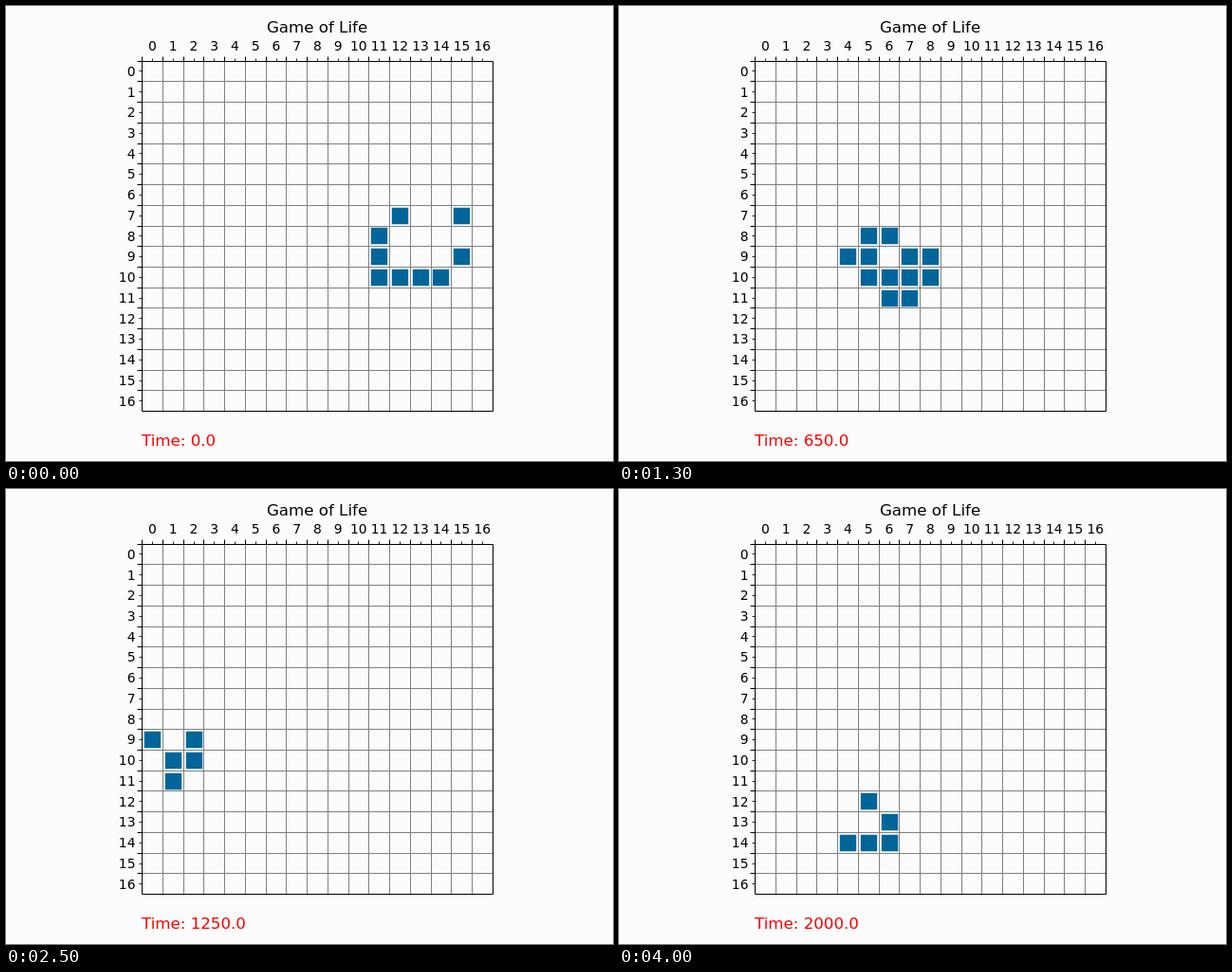
An HTML page that plays this animation: 640 by 480 pixels, repeating every 4100 ms.

```html
<!DOCTYPE html>
<html lang="en">
<head>
<meta charset="utf-8">
<title>Game of Life</title>
<style>
  html, body { margin: 0; width: 100%; height: 100%; overflow: hidden; background: #fcfcfc; }
  svg { display: block; width: 640px; height: 480px; font-family: "DejaVu Sans", sans-serif; font-size: 13.89px; }
  path { fill: none; }
  #grid { stroke: #808080; }
  #major, #frame { stroke: #000; }
  #minor { stroke: #2a2a2a; }
  #cells { fill: #069; }
  .big { font-size: 16.67px; }
  #time { fill: #f00; }
  .top, .title { text-anchor: middle; }
  .left { text-anchor: end; }
</style>
</head>
<body>
<svg viewBox="0 0 640 480">
  <path id="grid"/>
  <path id="major"/>
  <path id="minor"/>
  <path id="frame" d="M143.5 58.5H513.5V427.5H143.5Z"/>
  <path id="cells"/>
  <g id="labels"></g>
  <text class="big title" x="328" y="28">Game of Life</text>
  <text class="big" id="time" x="143" y="464"></text>
</svg>
<script>
const SIZE = 17, STEPS = 41, STEP_MS = 100;
const LEFT = 143.2, TOP = 57.6, CELL = 369.6 / SIZE;
const HALF = 8.69;

const $ = id => document.getElementById(id);
const px = i => LEFT + i * CELL;
const py = i => TOP + i * CELL;
const snap = v => Math.round(v) + 0.5;

function addLabel(text, cls, x, y) {
  const el = document.createElementNS("http://www.w3.org/2000/svg", "text");
  el.setAttribute("class", cls);
  el.setAttribute("x", x);
  el.setAttribute("y", y);
  el.textContent = text;
  $("labels").append(el);
}

function drawBoard() {
  let grid = "", major = "", minor = "";
  const ticks = (i, len) => `M${snap(px(i))} 58.5v${-len}M143.5 ${snap(py(i))}h${-len}`;
  for (let i = 0; i < SIZE; i++) {
    if (i) grid += `M${snap(px(i))} 58.5V427.5M143.5 ${snap(py(i))}H513.5`;
    major += ticks(i, 5);
    minor += ticks(i + 0.5, 3);
    addLabel(i, "top", px(i + 0.5) + 0.3, 47);
    addLabel(i, "left", 136.5, Math.round(py(i + 0.5) + 5.3));
  }
  $("grid").setAttribute("d", grid);
  $("major").setAttribute("d", major);
  $("minor").setAttribute("d", minor);
}

// Cells beyond the border count as dead.
const alive = (board, r, c) => board[r]?.[c] ? 1 : 0;

function nextBoard(board) {
  return board.map((row, r) => row.map((cell, c) => {
    let n = -cell;
    for (let dr = -1; dr <= 1; dr++)
      for (let dc = -1; dc <= 1; dc++) n += alive(board, r + dr, c + dc);
    return n === 3 || (cell && n === 2) ? 1 : 0;
  }));
}

function boardPath(board) {
  let d = "";
  board.forEach((row, r) => row.forEach((cell, c) => {
    if (!cell) return;
    const x = snap(px(c + 0.5)) - HALF, y = snap(py(r + 0.5)) - HALF, w = 2 * HALF;
    d += `M${x} ${y}h${w}v${w}h${-w}z`;
  }));
  return d;
}

function buildSteps() {
  const ship = [".#..#", "#....", "#...#", "####."];
  let board = Array.from({ length: SIZE }, (_, r) =>
    Array.from({ length: SIZE }, (_, c) => ship[r - 7]?.[c - 11] === "#" ? 1 : 0));
  const paths = [];
  for (let i = 0; i < STEPS; i++) {
    paths.push(boardPath(board));
    board = nextBoard(board);
  }
  return paths;
}

drawBoard();
const steps = buildSteps();
const start = performance.now();
let shown = -1;

function render() {
  const step = Math.floor((performance.now() - start) / STEP_MS) % STEPS;
  if (step !== shown) {
    shown = step;
    $("cells").setAttribute("d", steps[step]);
    $("time").textContent = `Time: ${(step * 50).toFixed(1)}`;
  }
  requestAnimationFrame(render);
}
render();
</script>
</body>
</html>
```
